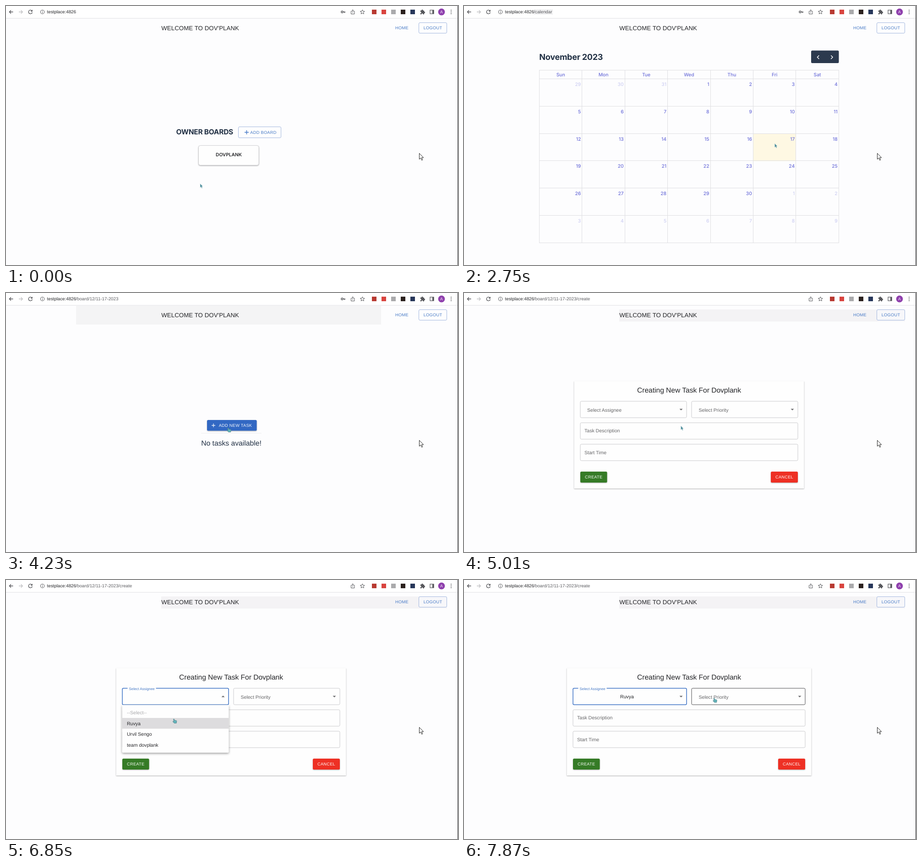
Recreate the animation shown at these times as an HTML page. Size 987x567 px, loop 7990 ms.

```html
<!DOCTYPE html>
<html lang="en">
<head>
<meta charset="utf-8">
<title>Task board</title>
<style>
html, body { margin: 0; width: 100%; height: 100%; overflow: hidden; background: #fdfdfe; }
svg { display: block; width: 987px; height: 567px; font-family: "Liberation Sans", Arial, sans-serif; text-rendering: geometricPrecision; }
.ui { font-family: Inter, sans-serif; }
.btn { font-size: 9.24px; letter-spacing: .264px; }
.card { filter: drop-shadow(0 1px 1px rgba(0,0,0,.32)); }
.menu { filter: drop-shadow(0 2px 2.5px rgba(0,0,0,.38)); }
</style>
</head>
<body>
<svg viewBox="0 0 987 567" xmlns="http://www.w3.org/2000/svg">
  <g id="chrome"></g>
  <g id="page"></g>
  <g id="pointer"></g>
  <path d="M902.5 322.5v13l3-2.8 2.3 5 2-.9-2.2-4.8h4.1z" fill="#fff" stroke="#222" stroke-width="1"/>
  <rect x="986" width="1" height="567" fill="#3a3a3d"/>
</svg>
<script>
const LOOP = 7990;
const BLUE = '#477ac6', INK = '#213044', GREY = '#666668', EDGE = '#a4b8df';

const text = (x, y, s, size, fill, more = '') =>
  `<text x="${x}" y="${y}" font-size="${size}" fill="${fill}" ${more}>${s}</text>`;
const rect = (x, y, w, h, fill, more = '') =>
  `<rect x="${x}" y="${y}" width="${w}" height="${h}" fill="${fill}" ${more}/>`;
const line = (d, stroke, width = 1, more = '') =>
  `<path d="${d}" fill="none" stroke="${stroke}" stroke-width="${width}" ${more}/>`;
const label = (x, y, s, fill) =>
  `<text x="${x}" y="${y}" class="btn" fill="${fill}" text-anchor="middle">${s}</text>`;
const MID = 'text-anchor="middle"';
const bold = w => `class="ui" font-weight="${w}"`;

// Number of the n evenly spaced steps from a to b that have happened by t.
const stepsDone = (t, a, b, n) =>
  t < a ? 0 : Math.min(n, Math.floor((t - a) / (b - a) * (n - 1) + 1e-6) + 1);
const ease = p => p * p * (3 - 2 * p);

function pathAt(p, [x0, y0], [x1, y1], sag = 0) {
  const e = ease(Math.min(1, p));
  return [x0 + (x1 - x0) * e, y0 + (y1 - y0) * e + sag * 4 * e * (1 - e)];
}

function toolbar(url, hasKey) {
  const icon = '#55565a';
  let s = rect(0, 0, 987, 27, '#fff') + rect(0, 26.5, 987, 1, '#e0e0e3');
  s += line('M15.5 13H7.5M11 9.2L7.3 13l3.7 3.8', icon, 1.3);
  s += line('M28 13h8M32.5 9.2l3.7 3.8-3.7 3.8', '#c2c2c5', 1.3);
  s += line('M56.4 10.3a4.1 4.1 0 1 0 .9 3.7', icon, 1.3) + `<path d="M57.8 8v4.2h-4.2z" fill="${icon}"/>`;
  s += `<circle cx="79.5" cy="13" r="4.1" fill="none" stroke="${icon}"/>` + line('M79.5 12.4v3M79.5 10.3v1.1', icon);
  if (url === '/calendar') s += rect(153, 7, 41, 12, '#f1f1f2');
  s += text(89.5, 16.4, 'testplace:4826', 9.75, '#28292c');
  s += text(152.3, 16.4, url, 9.75, '#5c5d61');
  if (hasKey) {
    s += `<circle cx="734" cy="13" r="2" fill="none" stroke="${icon}" stroke-width="1.5"/>`
      + line('M736 13h5M739.5 13v2.3', icon, 1.5);
  }
  s += line('M755.3 11.5h-1.8v6h7.4v-6h-1.8M757.2 14.8V8.3M755.2 10.2l2-2 2 2', icon);
  s += line('M778.3 8.3l1.4 3.1 3.4.3-2.6 2.2.8 3.4-3-1.8-3 1.8.8-3.4-2.6-2.2 3.4-.3z', icon);
  ['#b83a32', '#d9443f', '#aaaaac', '#2b211e', '#27375a'].forEach((c, i) => {
    s += rect(799 + 21 * i, 8, 10, 10, c);
  });
  s += `<path d="M904.8 10h2.5a1.7 1.7 0 1 1 3.2 0h2.6v2.6a1.6 1.6 0 1 1 0 3.1v2.5h-2.7a1.5 1.5 0 1 0-2.9 0h-2.7v-2.6a1.5 1.5 0 1 0 0-2.9z" fill="${icon}"/>`;
  s += rect(926, 9, 8, 8, 'none', `stroke="${icon}" stroke-width="1.2"`) + rect(931, 9, 3.2, 8, icon);
  s += '<circle cx="951" cy="13" r="7.4" fill="#8f40ad"/>' + text(951, 16.2, 'A', 8.8, '#f3e6f7', MID);
  for (const y of [9.3, 13, 16.7]) s += `<circle cx="972" cy="${y}" r="1.05" fill="${icon}"/>`;
  return s;
}

function header(tinted) {
  return text(339.3, 52.7, "WELCOME TO DOV'PLANK", 13.2, '#222326', 'letter-spacing=".1"')
    + label(864.5, 51.4, 'HOME', BLUE)
    + rect(901.5, 36.5, 61, 23, tinted ? '#f7f7fa' : 'none', `rx="2.5" stroke="${EDGE}"`)
    + label(932, 51.4, 'LOGOUT', BLUE);
}

function boards(hover) {
  let s = text(371.5, 280.8, 'OWNER BOARDS', 15.5, INK, bold(700) + ' letter-spacing="-.24"');
  s += rect(507.5, 264.5, 93, 24, '#fefefe', `rx="2.5" stroke="${EDGE}"`);
  s += line('M525.5 272v9M521 276.5h9', '#3f74c6', 1.4) + label(562, 279.8, 'ADD BOARD', BLUE);
  s += rect(420.5, 305.5, 131.5, 43, '#fefefe', 'rx="4" class="card" stroke="#cbcbcf" stroke-width=".8"');
  s += text(486.5, 328.5, 'DOVPLANK', 10.2, '#222326', bold(600) + ' ' + MID);
  if (hover) {
    s += '<path d="M531.8 329.8v-2l5.9-5.9 2 2-5.9 5.9zM538.3 321.3l1-1q.5-.4 1 0l1 1q.4.5 0 1l-1 1z" fill="#626366"/>';
  }
  return `<g transform="translate(0 ${hover ? -1 : 0})">${s}</g>`;
}

function calendar() {
  const left = 164.5, top = 160, colW = 93.4, rowH = 59.85, violet = '#6c6fd9';
  let s = text(164.3, 118.2, 'November 2023', 18, INK, bold(700) + ' letter-spacing="-.25"');
  s += rect(758, 97.5, 60.5, 27.5, '#2c3a4e', 'rx="2.5"');
  s += line('M775.3 108.2l-3.8 3.9 3.8 3.9M801.3 108.2l3.8 3.9-3.8 3.9', '#fff', 1.5);
  s += rect(left + 5 * colW, top + 2 * rowH, colW, rowH, '#fef8e3');
  let grid = '';
  for (let c = 0; c < 8; c++) grid += `M${Math.floor(left + c * colW) + .5} 141V519`;
  for (const y of [141, 160, 220, 280, 339, 399, 459, 519]) grid += `M164 ${y - .5}H819`;
  s += line(grid, '#dfdfe2');
  ['Sun', 'Mon', 'Tue', 'Wed', 'Thu', 'Fri', 'Sat'].forEach((d, c) => {
    s += text(left + (c + .5) * colW, 154.3, d, 10.3, violet, bold(500) + ' ' + MID);
  });
  for (let i = 0; i < 42; i++) {
    const n = i - 2, inside = n >= 1 && n <= 30;
    const day = n < 1 ? n + 31 : n > 30 ? n - 30 : n;
    s += text(left + (i % 7 + 1) * colW - 2.6, top + Math.floor(i / 7) * rowH + 14.8, day, 10.3, violet,
      bold(500) + ` text-anchor="end" opacity="${inside ? 1 : .32}"`);
  }
  return s;
}

function tasks(hover, ripple) {
  let s = rect(153, 27.5, 666, 41.5, '#f4f4f5');
  s += rect(439, 278, 108.5, 23.5, hover ? '#3268c3' : '#3d79cf', 'rx="2.5" class="card"');
  if (ripple) {
    s += `<clipPath id="clip">${rect(439, 278, 108.5, 23.5, '#000', 'rx="2.5"')}</clipPath>`
      + `<circle cx="487" cy="297" r="${14 * ripple}" fill="#fff" opacity=".16" clip-path="url(#clip)"/>`;
  }
  s += line('M453 285.8v8M449 289.8h8', '#fff', 1.2) + label(501, 293, 'ADD NEW TASK', '#f4f7fc');
  s += rect(426, 306.5, 132, 1, '#eeeef0');
  return s + text(492, 334, 'No tasks available!', 15.7, INK, MID);
}

function field(x, y, w, stroke, width = 1) {
  return rect(x, y, w, 36, '#fefefe', `rx="2.5" stroke="${stroke}" stroke-width="${width}"`);
}
const caret = (x, up) => `<path d="M${x - 3.5} ${up ? 256.6 : 253.4}h7l-3.5 ${up ? -3.5 : 3.5}z" fill="#6a6a6c"/>`;

// grow: how far each side of the card has widened
function form({ grow, hover, focus, value, menu, hoverRight }) {
  const l = 254 - grow, r = 729 + grow, thin = '#c9c9cc';
  let s = rect(339, 36, 566, 26.5, '#f4f3f5') + rect(905, 36, 58, 26.5, '#f6f5f8');
  s += rect(l - 13.5, 193, r - l + 27, 235, '#fefefe', 'class="card"');
  s += text(491.5, 218, 'Creating New Task For Dovplank', 15.55, '#222326', MID);
  s += field(l, 237, 486 - l, focus ? '#3f74c6' : hover ? '#333336' : thin, focus ? 1.5 : 1);
  if (focus) {
    s += rect(l + 11.5, 235.5, 62, 3, '#fefefe') + text(l + 14.5, 240.6, 'Select Assignee', 7.92, BLUE);
  } else {
    s += text(l + 15, 259.6, 'Select Assignee', 10.56, GREY);
  }
  if (value) s += text(356, 258.8, value, 10.56, '#222326', MID);
  s += caret(474, menu > 0);
  s += field(497, 237, r - 497, hoverRight ? '#4a4a4d' : thin) + text(512.5, 259.6, 'Select Priority', 10.56, GREY);
  s += caret(r - 12, false);
  s += field(l, 284, r - l, thin) + text(l + 9, 305.4, 'Task Description', 10.56, GREY);
  s += field(l, 331, r - l, thin) + text(l + 9, 352.6, 'Start Time', 10.56, GREY);
  s += rect(l, 391, 58.5, 24, '#357b26', 'rx="2.5" class="card"') + label(l + 29.2, 406.2, 'CREATE', '#f6faf5');
  s += rect(r - 59, 391, 59, 24, '#ee3024', 'rx="2.5" class="card"') + label(r - 29.5, 406.2, 'CANCEL', '#fff6f5');
  if (menu) {
    let m = rect(253.5, 273.5, 233, 104.5, '#fefefe', 'rx="2" class="menu"') + rect(253.5, 302, 233, 23.5, '#dddcde');
    ['--Select--', 'Ruvya', 'Urvil Sengo', 'team dovplank'].forEach((name, i) => {
      m += text(264, 294 + 23.6 * i, name, 10.56, i ? '#2a2a2d' : '#a9a9ac');
    });
    s += `<g opacity="${menu}">${m}</g>`;
  }
  return s;
}

const ARROW = '<path d="M-2.5-5v8.4l1.9-1.6 1.5 3 1.3-.6-1.4-2.9 2.3-.3z" fill="#4a8c9a" stroke="#c9dde1" stroke-width=".5"/>';
const HAND = '<path d="M-3-4.2q.9-1.2 1.9-.1l.9 2.5 3.2.3q1.5.4 1.3 1.8l-.7 4.2h-4.8l-3.2-3.4q.1-1.2 1.4-.7l1 .5z" fill="#62b4ba" stroke="#4d7480" stroke-width=".7"/>';
const pointer = ([x, y], hand) => `<g transform="translate(${x.toFixed(1)} ${y.toFixed(1)})">${hand ? HAND : ARROW}</g>`;

function scene(t) {
  let page, at, hand;
  const url = t < 1480 ? '' : t < 3310 ? '/calendar' : t < 4860 ? '/board/12/11-17-2023' : '/board/12/11-17-2023/create';
  if (t < 1630) {
    at = pathAt(stepsDone(t, 120, 950, 7) / 7, [426.5, 394], [475, 335]);
    hand = at[1] < 349;
    page = boards(hand);
  } else if (t < 3310) {
    const k = stepsDone(t, 2030, 2750, 6);
    at = pathAt(k / 6, [475, 335], [681, 306]);
    hand = k === 0;
    page = calendar();
  } else if (t < 5010) {
    const k = stepsDone(t, 3840, 4860, 9);
    at = pathAt(k / 4, [681, 306], [487, 300], 15);
    hand = at[0] < 547 && at[1] < 303;
    page = tasks(hand, Math.max(0, k - 4));
  } else {
    const move = stepsDone(t, 5010, 5910, 7);
    const open = stepsDone(t, 6180, 6450, 3);
    const pick = stepsDone(t, 6850, 7870, 8);
    if (pick > 3) at = pathAt((pick - 3) / 5, [364, 314], [548, 263.5]);
    else if (pick) at = pick === 1 ? [368.5, 309] : [364, 314];
    else if (open) at = pathAt(open / 3, [382, 261], [375, 284]);
    else at = pathAt(move / 5, [487, 300], [382, 261]);
    const hover = at[1] < 273, chosen = pick >= 3;
    hand = hover || open > 0;
    page = form({
      grow: chosen ? 16 : 0,
      hover,
      focus: open > 0,
      value: chosen ? 'Ruvya' : '',
      menu: pick > 3 ? 0 : chosen ? .5 : [0, .45, .85, 1][open],
      hoverRight: at[0] > 497 && hover
    });
  }
  // The task page and the form paint a tint behind the header.
  return { chrome: toolbar(url, t < 4860), page: page + header(t >= 5010), pointer: pointer(at, hand) };
}

const shown = {};
function draw(now) {
  const parts = scene(now % LOOP);
  for (const id in parts) {
    if (shown[id] !== parts[id]) document.getElementById(id).innerHTML = shown[id] = parts[id];
  }
}

const start = performance.now();
function tick() {
  draw(performance.now() - start);
  requestAnimationFrame(tick);
}
tick();
</script>
</body>
</html>
```
